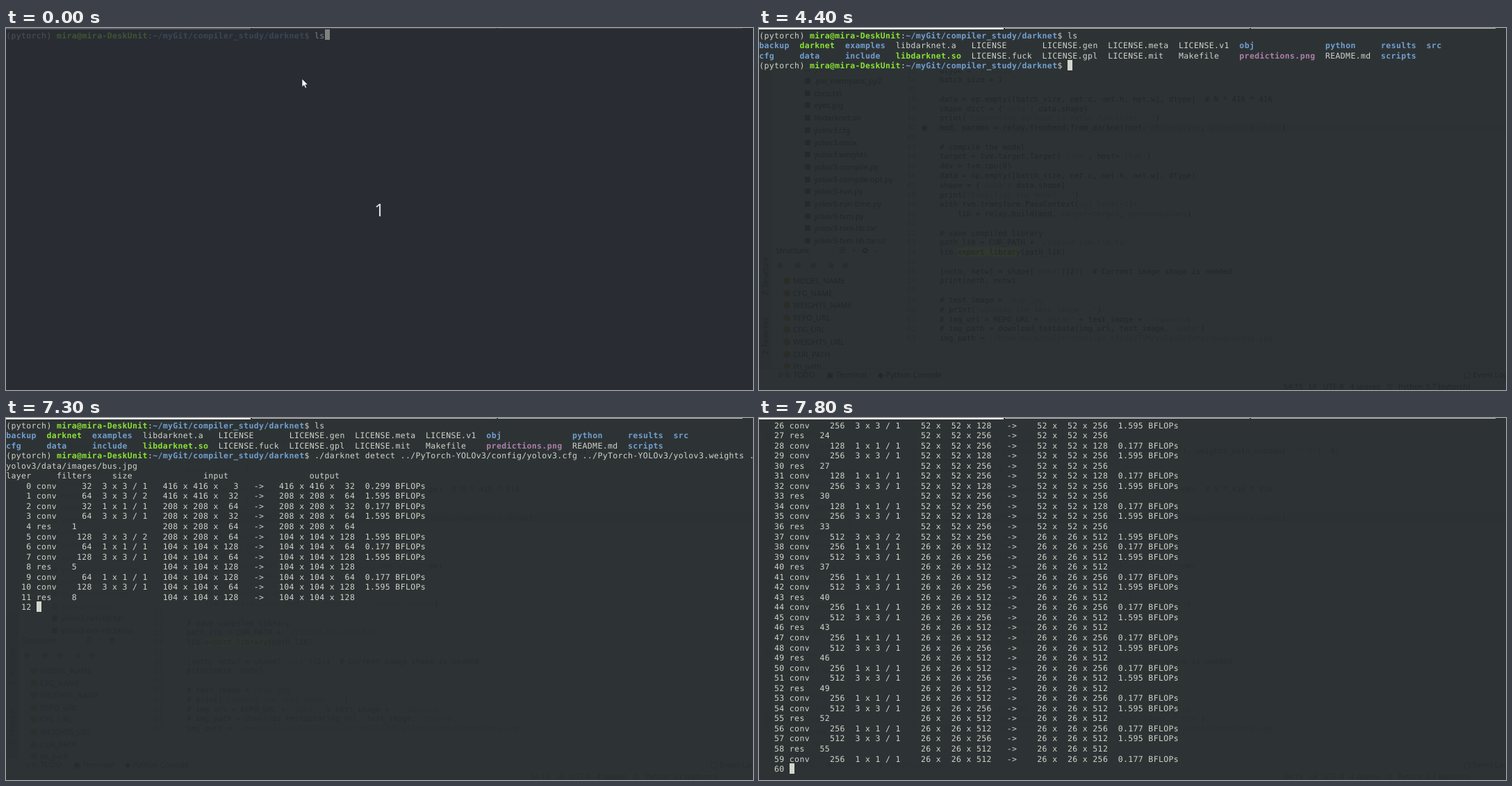
These frames come from a looping animation (1075 px wide and 521 px high, 8 s). An HTML page:

```html
<!DOCTYPE html>
<html lang="en">
<head>
<meta charset="utf-8">
<title>Terminal session</title>
<style>
  html, body { margin: 0; width: 100%; height: 100%; overflow: hidden; background: #2d3335; }
  #stage { position: relative; width: 1075px; height: 521px; overflow: hidden; background: #2d3335; }
  #stage > * { position: absolute; }
  .mono, pre {
    font-family: "DejaVu Sans Mono", monospace;
    letter-spacing: calc(var(--cell) - 1ch);
    text-rendering: geometricPrecision;
    white-space: pre;
  }

  #ide { inset: 0; color: #22282a; font: 11px "Noto Sans", sans-serif; }
  #ide > * { position: absolute; white-space: pre; }
  #ide .text { transform: translateY(-50%); line-height: 14px; }
  #ide .side { transform: translate(-50%, -50%) rotate(-90deg); font-size: 10px; }
  #ide .mono { --cell: 6.47px; font-size: 10.75px; }
  #ide i { font-style: normal; opacity: .4; }
  #ide .dot { border-radius: 50%; }
  #cover { left: 0; top: 2px; width: 1075px; background: #2d3335; }

  #term { left: .2px; top: 3.5px; margin: 0; --cell: 7.275px; font-size: 11.5px; line-height: 14.54px; color: #d0d4ca; }
  #term b { color: #729fcf; }
  #term b.g { color: #8ae234; }
  #term b.p { color: #ad7fa8; }
  #term u { position: relative; top: -1px; text-decoration: none; color: #2d3335; background: #d3d7cf; padding: .55px 0; }

  .tab { top: 0; height: 1px; width: 352px; background: #b8bbb6; }
  .tab.on { height: 2px; background: #eeeeec; }
  #count { left: 0; width: 1075px; top: 244px; text-align: center; font: 25px/34px "Noto Sans", sans-serif; color: #dcdedf; }
  #mouse { left: 425px; top: 72px; }
  #count, #mouse { visibility: hidden; }

  .dim#stage { background: #292d33; }
  .dim #ide, .dim #cover { visibility: hidden; }
  .dim .tab, .dim #term span { opacity: .22; }
  .dim #term em { opacity: .5; }
  .dim #count, .dim #mouse { visibility: visible; }
  .mid#stage { background: #2b3034; }
  .mid #ide, .mid #cover { visibility: hidden; }
  .mid .tab, .mid #term { opacity: .65; }
  .out #ide { opacity: .55; }
  .out #cover { width: 610px; opacity: .65; }
  em { font-style: normal; }
</style>
</head>
<body>
<div id="stage">
  <div id="ide"></div>
  <div id="cover"></div>
  <div class="tab on" style="left:0"></div>
  <div class="tab" style="left:354px"></div>
  <div class="tab" style="left:708px"></div>
  <pre id="term"></pre>
  <div id="count">1</div>
  <svg id="mouse" width="12" height="18"><path d="M1 1v12l2.9-2.6 1.8 4.2 2-.9-1.8-4h3.7z" fill="#fff" stroke="#15181b" stroke-width=".7"/></svg>
</div>
<script>
const LOOP = 8000, ROWS = 35, ROW = 14.54;
const $ = id => document.getElementById(id);
const stage = $('stage'), term = $('term'), cover = $('cover'), ide = $('ide');

// Editor window showing faintly through the terminal
function add(cls, html, css) {
  const el = document.createElement('div');
  el.className = cls;
  el.innerHTML = html;
  el.style.cssText = css;
  ide.append(el);
}
const text = (x, y, s, cls = '', css = '') => add('text ' + cls, s, `left:${x}px;top:${y}px;${css}`);
const block = (x, y, w, h, cls = '', color = '#252b2c') =>
  add(cls, '', `left:${x}px;top:${y}px;width:${w}px;height:${h}px;background:${color}`);

const code = `DARKNET_LIB = __darknetffi__.dlopen(lib_path)
net = DARKNET_LIB.load_network(cfg_path.encode('utf-8'), weights_path.encode('utf-8'), 0)
dtype = 'float32'
batch_size = 1

data = np.empty([batch_size, net.c, net.h, net.w], dtype)  # N * 416 * 416
shape_dict = {'data': data.shape}
print("Converting darknet to relay functions...")
mod, params = relay.frontend.from_darknet(net, dtype=dtype, shape=data.shape)

# compile the model
target = tvm.target.Target('llvm', host='llvm')
dev = tvm.cpu(0)
data = np.empty([batch_size, net.c, net.h, net.w], dtype)
shape = {'data': data.shape}
print("Compiling the model...")
with tvm.transform.PassContext(opt_level=3):
    lib = relay.build(mod, target=target, params=params)

# save compiled library
path_lib = CUR_PATH + '/yolov3-tvm-lib.tar'
lib.export_library(path_lib)

[neth, netw] = shape['data'][2:]  # Current image shape is needed
print(neth, netw)

# test_image = 'dog.jpg'
# print("Loading the test image...")
# img_url = REPO_URL + 'data/' + test_image + '?raw=true'
# img_path = download_testdata(img_url, test_image, 'data')
img_path = '/home/mira/myGit/compiler_study/TVM/yolov3/data/images/dog.jpg'`;

block(0, 2, 18, 488, '', '#2b3133');
block(200, 2, 1, 488, '', '#2b3132');
block(252, 137, 823, 14, '', '#2c3234');
block(286, 316, 90, 13, '', '#30372f');
block(234, 140, 8, 8, 'dot');
code.split('\n').forEach((line, i) => {
  const y = 34 + i * 13.77;
  text(213, y, `<i>${33 + i}</i>`, 'mono');
  text(260, y, line.replace(/'[^']*'|"[^"]*"|\b\w+=\w[\w.]*/g, '<i>$&</i>'), 'mono');
});

text(38, 58, '▾');
text(80, 58, 'yolov3');
text(64, 40, '.pai_mempass_py');
text(50, 23, 'compiler');
block(64, 54, 10, 8);
'.pai_mempass_py2 coco.txt eyes.jpg libdarknet.so yolov3.cfg yolov3.onnx yolov3.weights yolov3-compile.py yolov3-compile-opt.py yolov3-run.py yolov3-run-time.py yolov3-tvm.py yolov3-tvm-lib.tar yolov3-tvm-lib.tar.so'
  .split(' ').forEach((name, i) => {
    const y = 76 + i * 17.7;
    block(66, y - 4, 8, 8);
    text(79, y, name, '', 'width:121px;overflow:hidden');
  });
text(24, 320, 'Structure');
text(115, 320, '☰   ÷   ✿   –');
[30, 56, 78, 104, 124].forEach(x => block(x - 4, 338, 8, 8, 'dot', '#282e30'));
'MODEL_NAME CFG_NAME WEIGHTS_NAME REPO_URL CFG_URL WEIGHTS_URL CUR_PATH lib_path'
  .split(' ').forEach((name, i) => {
    const y = 364 + i * 17.6;
    block(35, y - 5, 10, 10, 'dot', '#2b2d28');
    text(49, y, name);
  });
text(9, 40, '1: Project', 'side');
text(9, 357, 'Z: Structure', 'side');
text(9, 443, '2: Favorites', 'side');
block(0, 490, 1075, 1, '', '#2b3132');
text(28, 499, '≡ 6: TODO');
text(97, 499, '▣ Terminal');
text(171, 499, '◆ Python Console');
text(1014, 499, '▢ Event Log');
text(755, 516, '54:15   LF   UTF-8   4 spaces   ⚿   Python 3.7 (pytorch)');

// Terminal contents
const cur = (c = ' ') => `<u>${c}</u>`;
const prompt = '<span>(pytorch) <b class="g">mira@mira-DeskUnit</b>:<b>~/myGit/compiler_study/darknet</b>$ </span>';
const cols = [0, 8, 17, 27, 42, 56, 69, 83, 95, 112, 123, 132, 140];

// Prefix d, x or i marks a directory, a program or an image
function listing(names) {
  const tags = { 'd:': '<b>', 'x:': '<b class="g">', 'i:': '<b class="p">' };
  return names.split(' ').map((item, i) => {
    const tag = tags[item.slice(0, 2)];
    const name = tag ? item.slice(2) : item;
    return (tag ? tag + name + '</b>' : name) + ' '.repeat(cols[i + 1] - cols[i] - name.length);
  }).join('');
}
const listed = [
  prompt + 'ls',
  listing('d:backup x:darknet d:examples libdarknet.a LICENSE LICENSE.gen LICENSE.meta LICENSE.v1 d:obj d:python d:results d:src'),
  listing('d:cfg d:data d:include x:libdarknet.so LICENSE.fuck LICENSE.gpl LICENSE.mit Makefile i:predictions.png README.md d:scripts')
];
const cmd = './darknet detect ../PyTorch-YOLOv3/config/yolov3.cfg ../PyTorch-YOLOv3/yolov3.weights ../yolov3/data/images/bus.jpg';

const first = s => [prompt + `<em>${s}</em>`];
const typed = s => [...listed, prompt + s];
function search(key, showCursor = true) {
  const at = cmd.lastIndexOf(key);
  const found = showCursor ? cmd.slice(0, at) + cur(cmd[at]) + cmd.slice(at + 1) : cmd;
  return [...listed, `(reverse-i-search)\`${key}': ` + found];
}
const sent = [...listed, prompt + cmd.slice(0, 89), cmd.slice(89)];

// Network layers: a strided convolution, then residual blocks, per stage
const layers = [];
const pad = (v, n) => String(v).padStart(n);
const dims = (size, c) => [size, size, c].map(v => pad(v, 4)).join(' x');
const index = i => pad(i, 5) + ' ';
function conv(n, k, stride, size, c) {
  const out = size / stride;
  const flops = (2 * n * k * k * c * out * out / 1e9).toFixed(3);
  layers.push(`${index(layers.length)}conv  ${pad(n, 5)} ${pad(k, 2)} x${pad(k, 2)} /${pad(stride, 2)}  ` +
    `${dims(size, c)}   -&gt;  ${dims(out, n)}  ${flops} BFLOPs`);
}
function res(size, c) {
  const i = layers.length;
  layers.push(`${index(i)}res  ${pad(i - 3, 3)}${' '.repeat(16)}${dims(size, c)}   -&gt;  ${dims(size, c)}`);
}
conv(32, 3, 1, 416, 3);
let size = 416, depth = 32;
for (const repeats of [1, 2, 8, 8]) {
  conv(depth * 2, 3, 2, size, depth);
  size /= 2;
  depth *= 2;
  for (let i = 0; i < repeats; i++) {
    conv(depth / 2, 1, 1, size, depth);
    conv(depth, 3, 1, size, depth / 2);
    res(size, depth);
  }
}
const header = 'layer     filters    size              input                output';
const output = n => [...sent, header, ...layers.slice(0, n), index(n) + cur()].slice(-ROWS);

const steps = [
  [0, first('ls' + cur()), 'dim'],
  [200, first('ls' + cur()), 'mid'],
  [300, first('l' + cur())],
  [500, first(cur())],
  [1000, first('ls' + cur())],
  [1500, typed(cur())],
  [2000, typed('')],
  [2200, typed(cur())],
  [2600, typed('.' + cur())],
  [2800, typed('./d' + cur())],
  [3100, typed('./dar' + cur())],
  [3700, typed('./dar')],
  [4200, typed('./dar' + cur())],
  [4400, typed(cur())],
  [4700, [...listed, "(reverse-i-search)`': " + cur()]],
  [5200, search('.')],
  [5500, search('./')],
  [5800, search('./', false)],
  [6200, sent],
  ...[12, 37, 42, 48, 54, 60].map((n, i) => [7300 + i * 100, output(n), 'out'])
];

let shown;
function draw() {
  const t = performance.now() % LOOP;
  const step = steps.findLast(s => s[0] <= t);
  if (step !== shown) {
    const [, lines, mode = ''] = shown = step;
    term.innerHTML = lines.join('\n');
    stage.className = mode;
    cover.style.height = lines.length * ROW + 1 + 'px';
  }
  requestAnimationFrame(draw);
}
draw();
</script>
</body>
</html>
```
